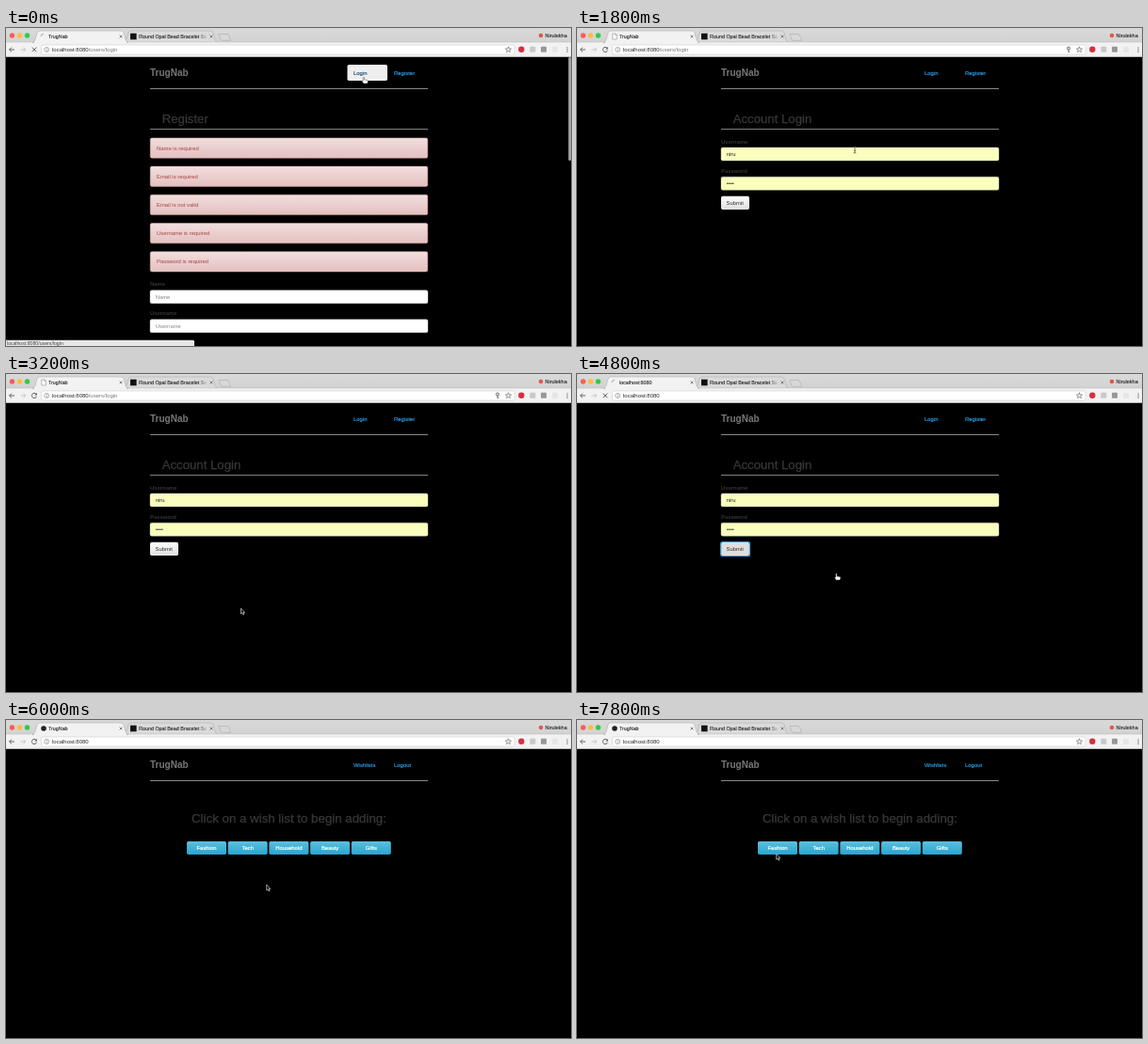
These frames come from a looping animation (600 px wide and 338 px high, 8 s). An HTML page:

```html
<!DOCTYPE html>
<html lang="en">
<head>
<meta charset="utf-8">
<title>Login walkthrough</title>
<style>
  html, body { margin: 0; width: 100%; height: 100%; overflow: hidden; background: #000; }
  svg { display: block; width: 100vw; height: 100vh; }
  text { font-family: "Liberation Sans", Arial, sans-serif; white-space: pre; }
</style>
</head>
<body>
<svg id="stage" viewBox="0 0 600 338"></svg>
<script>
const LOOP = 8000, STEP = 200;
const LOGIN_AT = 200, SUBMIT_AT = 4400, LISTS_AT = 5000;
const BRAND = 'TrugNab', LINK = '#2f9fe8', DIM = '#383838';
const LISTS = ['Fashion', 'Tech', 'Household', 'Beauty', 'Gifts'];

// time, x, y of the pointer tip
const PATH = [
  [0, 380, 52], [1200, 380, 52], [1400, 364, 70], [1800, 295, 129], [2400, 262, 178],
  [3200, 249.5, 249], [3600, 232, 236], [4000, 180, 189], [4600, 172, 186],
  [4800, 275.5, 212], [5000, 277, 200], [5600, 276.7, 175], [6000, 276.7, 175],
  [6400, 300, 138], [6800, 385, 138], [7200, 385, 138], [7400, 302, 138],
  [7600, 222, 138], [7800, 211.7, 142.3], [8000, 211.7, 142.3]
];

const rect = (x, y, w, h, fill, r = 0, more = '') =>
  `<rect x="${x}" y="${y}" width="${w}" height="${h}" rx="${r}" fill="${fill}" ${more}/>`;
const text = (x, y, s, size, fill, more = '') =>
  `<text x="${x}" y="${y}" font-size="${size}" fill="${fill}" ${more}>${s}</text>`;
const path = (d, fill, stroke = 'none', width = 1, more = '') =>
  `<path d="${d}" fill="${fill}" stroke="${stroke}" stroke-width="${width}" ${more}/>`;
const dot = (x, y, r, fill, more = '') =>
  `<circle cx="${x}" cy="${y}" r="${r}" fill="${fill}" ${more}/>`;
const line = (y, color) => rect(153, y, 295, 1, color);
const bold = 'font-weight="700"';
const medium = (color, width) => `stroke="${color}" stroke-width="${width}"`;

const gradient = (id, from, to) =>
  `<linearGradient id="${id}" x2="0" y2="1"><stop stop-color="${from}"/><stop offset="1" stop-color="${to}"/></linearGradient>`;
const DEFS = '<defs>' + gradient('alert', '#f2dede', '#e4c0c0') + gradient('info', '#5bc0de', '#2ba4cf') +
  gradient('plain', '#ffffff', '#dedede') + gradient('strip', '#d9d9d9', '#cccccc') +
  '<linearGradient id="fade"><stop stop-color="#dadada" stop-opacity="0"/><stop offset="1" stop-color="#dadada"/></linearGradient></defs>';

function pointer(t) {
  const i = PATH.findIndex(p => p[0] > t);
  const [t0, x0, y0] = PATH[i - 1], [t1, x1, y1] = PATH[i];
  const k = (t - t0) / (t1 - t0);
  return [x0 + (x1 - x0) * k, y0 + (y1 - y0) * k];
}

function cursor(kind, x, y) {
  const shapes = {
    arrow: path('M0 0V6L1.4 4.8L2.4 7L3.3 6.6L2.4 4.5H4.2Z', '#111', '#ddd', 0.65),
    hand: path('M-.7 .5Q0-.4 .6 .5V3L3.6 3.5Q4.6 3.7 4.4 4.8L3.7 7H-.2L-2 4.5Q-1.7 3.4-.7 4.3Z', '#fff', '#222', 0.4),
    beam: path('M-1.4-3Q0-3 0-2V3Q0 4-1.4 4M1.4-3Q0-3 0-2M0 3Q0 4 1.4 4M-.8 1.4H.8', 'none', '#555', 0.8)
  };
  return `<g transform="translate(${x} ${y})">${shapes[kind]}</g>`;
}

function tabIcon(t, loading) {
  if (loading) {
    return path('M40 6.2A2.8 2.8 0 0 1 42.8 9', 'none', '#999', 0.8, `transform="rotate(${t * 0.45 - 90} 40 9)"`);
  }
  return t >= LISTS_AT ? dot(40, 9, 2.8, '#222') :
    path('M37.8 6H40.8L42.2 7.4V12H37.8ZM40.8 6V7.4H42.2', '#fff', '#777', 0.5);
}

function browser(t, loading) {
  const close = x => path(`M${x - 1.4} 7.6L${x + 1.4} 10.4M${x + 1.4} 7.6L${x - 1.4} 10.4`, 'none', '#555', 0.7);
  const title = t >= SUBMIT_AT && t < LISTS_AT ? 'localhost:8080' : BRAND;
  const url = t < SUBMIT_AT ? 'localhost:8080<tspan fill="#777">/users/login</tspan>' : 'localhost:8080';
  const hasKey = t >= LOGIN_AT && t < SUBMIT_AT;
  const tab = (x, w, fill) =>
    path(`M${x} 15.5Q${x + 2} 15 ${x + 3} 12.5L${x + 5} 5Q${x + 6} 3 ${x + 8} 3H${x + w - 8}Q${x + w - 6} 3 ${x + w - 5} 5L${x + w - 3} 12.5Q${x + w - 2} 15 ${x + w} 15.5Z`, fill, '#a5a5a5', 0.5);
  return rect(0, 0, 600, 30, 'url(#strip)') +
    ['#fc5b57', '#fdbc40', '#34c84a'].map((c, i) => dot(6.5 + 8 * i, 8, 2.7, c)).join('') +
    tab(125, 100, '#dadada') +
    path('M226 6.5H235Q236 6.5 236.4 7.5L238.6 13.3H229.5Q228.4 13.3 228 12.3Z', '#d8d8d8', '#a0a0a0', 0.5) +
    rect(0, 15, 600, 15.6, '#f2f2f2') + rect(0, 14.8, 600, 0.4, '#a8a8a8') + tab(28, 102, '#f2f2f2') +
    rect(30, 15, 98, 1, '#f2f2f2') + rect(0, 30, 600, 0.8, '#c0c0c0') +
    tabIcon(t, loading) + text(45, 11, title, 5.35, '#222', medium('#222', 0.1)) + close(122) +
    rect(132, 5.7, 6.6, 6.6, '#111') + text(141, 11, 'Round Opal Bead Bracelet Se', 5.4, '#222', medium('#222', 0.1)) +
    rect(204, 5, 10, 8, 'url(#fade)') + close(218) +
    dot(568, 8, 2.3, '#e2574c') + text(572.5, 10, 'Nirulekha', 5.5, '#222', medium('#222', 0.1)) +
    path('M9 23H3.6M6 20.6L3.6 23L6 25.4', 'none', '#555', 0.9) +
    path('M15.5 23H20.8M18.4 20.6L20.8 23L18.4 25.4', 'none', '#c2c2c2', 0.9) +
    (loading ? path('M27.8 20.6L32.4 25.2M32.4 20.6L27.8 25.2', 'none', '#555', 0.9) :
      path('M32 21.3A2.6 2.6 0 1 0 32.5 23.7', 'none', '#555', 0.9) + path('M32.8 20V22.5H30.3Z', '#555')) +
    rect(37.5, 18, 502.5, 10, '#fff', 1.5, 'stroke="#c4c4c4" stroke-width=".5"') +
    dot(43.2, 23, 2.5, 'none', 'stroke="#777" stroke-width=".6"') + rect(42.9, 22.5, 0.7, 2, '#777') + rect(42.9, 21.3, 0.7, 0.7, '#777') +
    text(49, 25.1, url, 6, '#222') +
    (hasKey ? dot(522, 21.6, 1.5, 'none', 'stroke="#555" stroke-width=".9"') + path('M522 23V26M522 25.2H523.3', 'none', '#555', 0.8) : '') +
    path('M533.5 19.8L534.3 22L536.6 22.1L534.8 23.5L535.4 25.7L533.5 24.4L531.6 25.7L532.2 23.5L530.4 22.1L532.7 22Z', 'none', '#555', 0.6) +
    dot(547.3, 22.8, 3.2, '#d5303e') + rect(556.3, 19.8, 6, 6, '#c6cac8', 1) +
    rect(568, 19.8, 6, 6, '#979797', 1) + rect(580, 19.8, 6, 6, '#e6e6e6', 1) +
    [20.8, 23, 25.2].map(y => dot(596, y, 0.65, '#555')).join('');
}

const status = s => path('M0 331.7H198.5Q200 331.7 200 333.2V338H0Z', '#e6e6e6') + text(0.8, 336.9, s, 5.2, '#444');

function header(links, lit) {
  const first = lit ? '#23527c' : LINK;
  return text(153, 51.3, BRAND, 10, '#777', bold) + line(64, '#888') +
    (lit ? rect(362.5, 39, 42.5, 17, '#eee', 1.8) : '') +
    text(369, 49.6, links[0], 5.95, first, medium(first, 0.15)) +
    text(412, 49.6, links[1], 5.95, LINK, medium(LINK, 0.15));
}

const heading = s => text(165.7, 101.2, s, 13.2, DIM, medium(DIM, 0.25)) + line(107, '#808080');

function field(y, label, value, fill, ink) {
  return text(153, y - 4.4, label, 5.9, '#333', bold) +
    rect(153, y, 295, 14, fill, 1.7, 'stroke="#ccc" stroke-width=".4"') + text(158.7, y + 9.2, value, 5.9, ink);
}

function registerPage() {
  const alerts = ['Name is required', 'Email is required', 'Email is not valid', 'Username is required', 'Password is required'];
  return header(['Login', 'Register'], true) + heading('Register') +
    alerts.map((s, i) => {
      const y = 116.9 + 30.2 * i;
      return rect(153.2, y, 294.6, 21.3, 'url(#alert)', 1.7, 'stroke="#d9a3a3" stroke-width=".5"') + text(160, y + 12.7, s, 5.9, '#a94442');
    }).join('') +
    field(278.7, 'Name', 'Name', '#fff', '#888') + field(309.7, 'Username', 'Username', '#fff', '#888') +
    rect(597.3, 31, 2.7, 110, '#a6a6a6', 1.3) + status('localhost:8080/users/login');
}

function loginPage(sent) {
  const ring = sent ? rect(152.7, 178.5, 30.8, 15, 'none', 2, 'stroke="#4aa3e0" stroke-width="1.2"') : '';
  return header(['Login', 'Register']) + heading('Account Login') +
    field(127, 'Username', 'niru', '#faffbd', '#222') + field(158.2, 'Password', '••••', '#faffbd', '#222') +
    rect(153, 178.8, 30, 14.2, sent ? '#dedede' : 'url(#plain)', 1.7) + ring + text(158.5, 188, 'Submit', 5.9, '#333');
}

function listsPage(hovered) {
  return header(['Wishlists', 'Logout']) +
    text(197, 109.4, 'Click on a wish list to begin adding:', 13.3, DIM, medium(DIM, 0.25)) +
    LISTS.map((s, i) => {
      const x = 192 + 43.7 * i;
      return rect(x, 129, 42, 14, i === hovered ? '#2aabd2' : 'url(#info)', 1.7) +
        text(x + 21, 138.3, s, 5.9, '#fff', 'text-anchor="middle" ' + medium('#fff', 0.22));
    }).join('') +
    (hovered >= 0 ? status('localhost:8080/lists/' + LISTS[hovered].toLowerCase()) : '');
}

function scene(t) {
  const [x, y] = pointer(t);
  const sent = t >= SUBMIT_AT && t < LISTS_AT;
  const inside = (x0, y0, x1, y1) => x >= x0 && x <= x1 && y >= y0 && y <= y1;
  let page, kind = 'arrow';
  if (t >= LISTS_AT) {
    const hovered = LISTS.findIndex((s, i) => inside(192 + 43.7 * i, 129, 234 + 43.7 * i, 142));
    page = listsPage(hovered);
    if (hovered >= 0) kind = 'hand';
  } else {
    page = t < LOGIN_AT ? registerPage() : loginPage(sent);
    if (sent || inside(362, 39, 448, 56) || inside(153, 179, 183, 193)) kind = 'hand';
    else if (inside(153, 127, 448, 141) || inside(153, 158, 448, 172)) kind = 'beam';
  }
  return DEFS + rect(0, 0, 600, 338, '#000') + page + browser(t, t < LOGIN_AT || sent) + cursor(kind, x, y);
}

const stage = document.getElementById('stage');
const start = performance.now();
let shown = -1;
function tick() {
  const t = Math.floor(((performance.now() - start) % LOOP) / STEP) * STEP;
  if (t !== shown) stage.innerHTML = scene(shown = t);
  requestAnimationFrame(tick);
}
tick();
</script>
</body>
</html>
```
